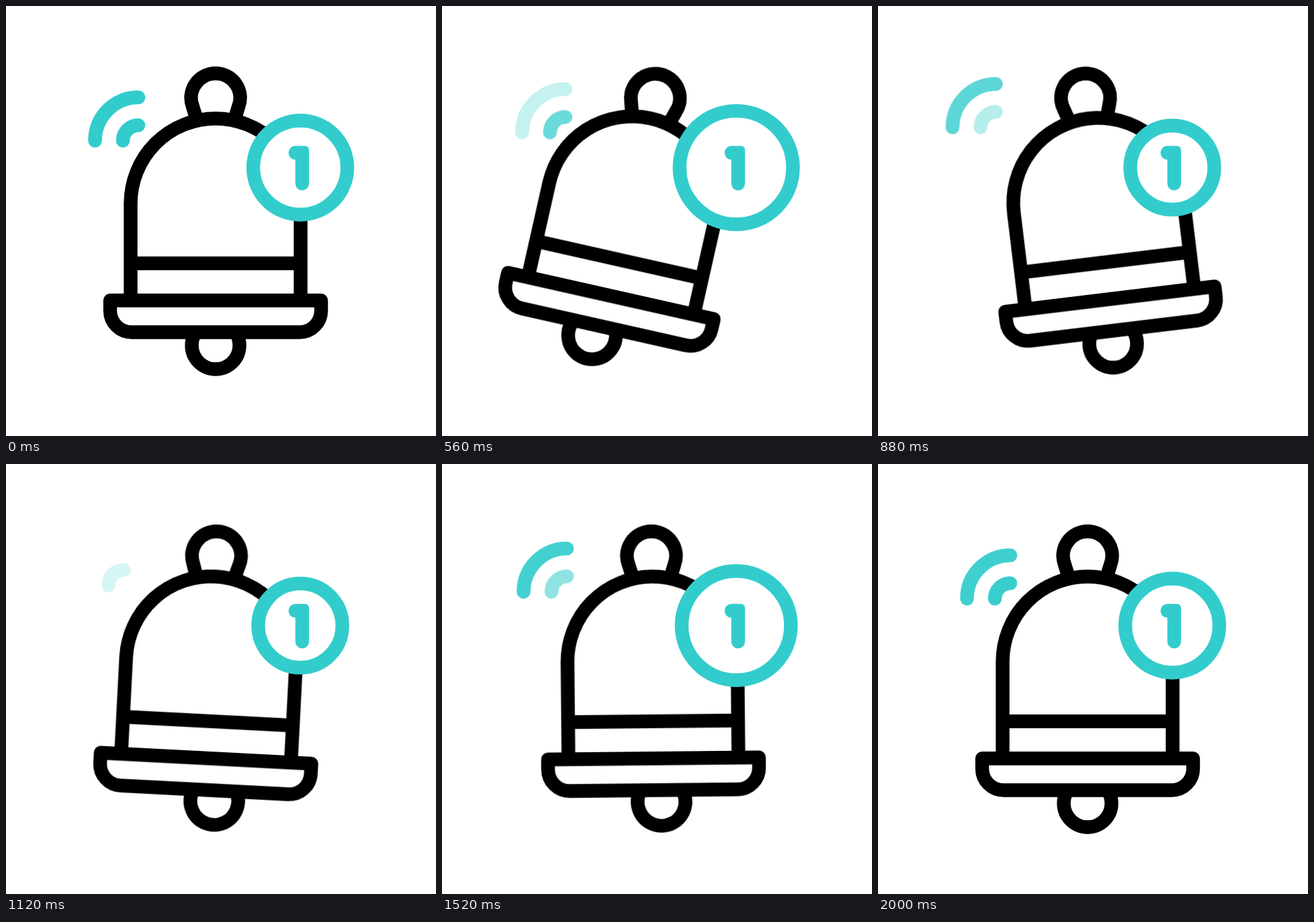
An HTML page without scripts that plays this animation: 640 by 640 pixels, repeating every 2040 ms.

```html
<!DOCTYPE html>
<html lang="en">
<head>
<meta charset="utf-8">
<title>Ringing bell</title>
<style>
  html, body { margin: 0; width: 100%; height: 100%; overflow: hidden; background: #fff; }
  svg { display: block; width: 100vw; height: 100vh; }

  .bell, .clapper, .waves, .inner, .outer, .badge {
    animation: 2040ms cubic-bezier(.37, 0, .63, 1) infinite;
  }
  .line { fill: #fff; stroke: #000; stroke-width: 20.4; stroke-linejoin: round; }
  .wave { fill: none; stroke: #3cc; stroke-width: 20.6; stroke-linecap: round; }
  .badge { fill: #fff; stroke: #3cc; stroke-width: 20.4; r: 70px; animation-name: pulse; }
  .one { fill: #3cc; }

  .bell { transform-origin: 312px 162px; animation-name: swing; }
  .clapper { transform-origin: 312px 471px; animation-name: knock; }
  .waves { animation-name: drift; }
  .inner { animation-name: blink-inner; }
  .outer { animation-name: blink-outer; }

  /* damped swing of the whole bell */
  @keyframes swing {
    0%, 92.16%, 100% { transform: rotate(0deg); }
    25.98% { transform: rotate(13.1deg); }
    42.16% { transform: rotate(-7deg); }
    58.82% { transform: rotate(4.4deg); }
    75.49% { transform: rotate(-.6deg); }
  }
  /* the clapper lags behind */
  @keyframes knock {
    0%, 12.25%, 98.04%, 100% { transform: rotate(0deg); }
    31.37% { transform: rotate(28deg); }
    58.82% { transform: rotate(-30deg); }
  }
  @keyframes drift {
    0%, 100% { transform: translate(0, 0); }
    49.02% { transform: translate(-22.3px, -20.6px); }
  }
  @keyframes blink-inner {
    0%, 33.33%, 66.67%, 100% { opacity: 1; }
    16.67%, 50%, 83.33% { opacity: 0; }
  }
  @keyframes blink-outer {
    0%, 38.24%, 71.57%, 100% { opacity: 1; }
    21.57%, 54.9%, 88.24% { opacity: 0; }
  }
  @keyframes pulse {
    0%, 8.82%, 87.25%, 100% { r: 70px; }
    26.47%, 68.63% { r: 84.6px; }
    43.63%, 54.41% { r: 62.5px; }
  }
</style>
</head>
<body>
<svg viewBox="0 0 640 640">
  <g class="bell">
    <path class="line" d="M283 166L278 150A36.5 36.5 0 1 1 346 150L341 166"/>
    <circle class="line clapper" cx="312" cy="505" r="35.5"/>
    <path class="line" d="M185.5 438.5V294a126.5 126.5 0 0 1 253 0V438.5z"/>
    <path class="line" d="M185.5 383H438.5"/>
    <path class="line" d="M155 438.3H469V453.5a32 32 0 0 1-32 32H187a32 32 0 0 1-32-32z"/>
  </g>
  <g class="waves">
    <path class="wave outer" d="M132.5 200.5A64.5 64.5 0 0 1 197 136"/>
    <path class="wave inner" d="M174 200.5A23 23 0 0 1 197 177.5"/>
  </g>
  <circle class="badge" cx="438" cy="240.5" r="70"/>
  <path class="one" d="M431 208.2h14a6 6 0 0 1 6 6V264.3a10.2 10.2 0 0 1-20.4 0V228.8a10.3 10.3 0 0 1 .4-20.6z"/>
</svg>
</body>
</html>
```
